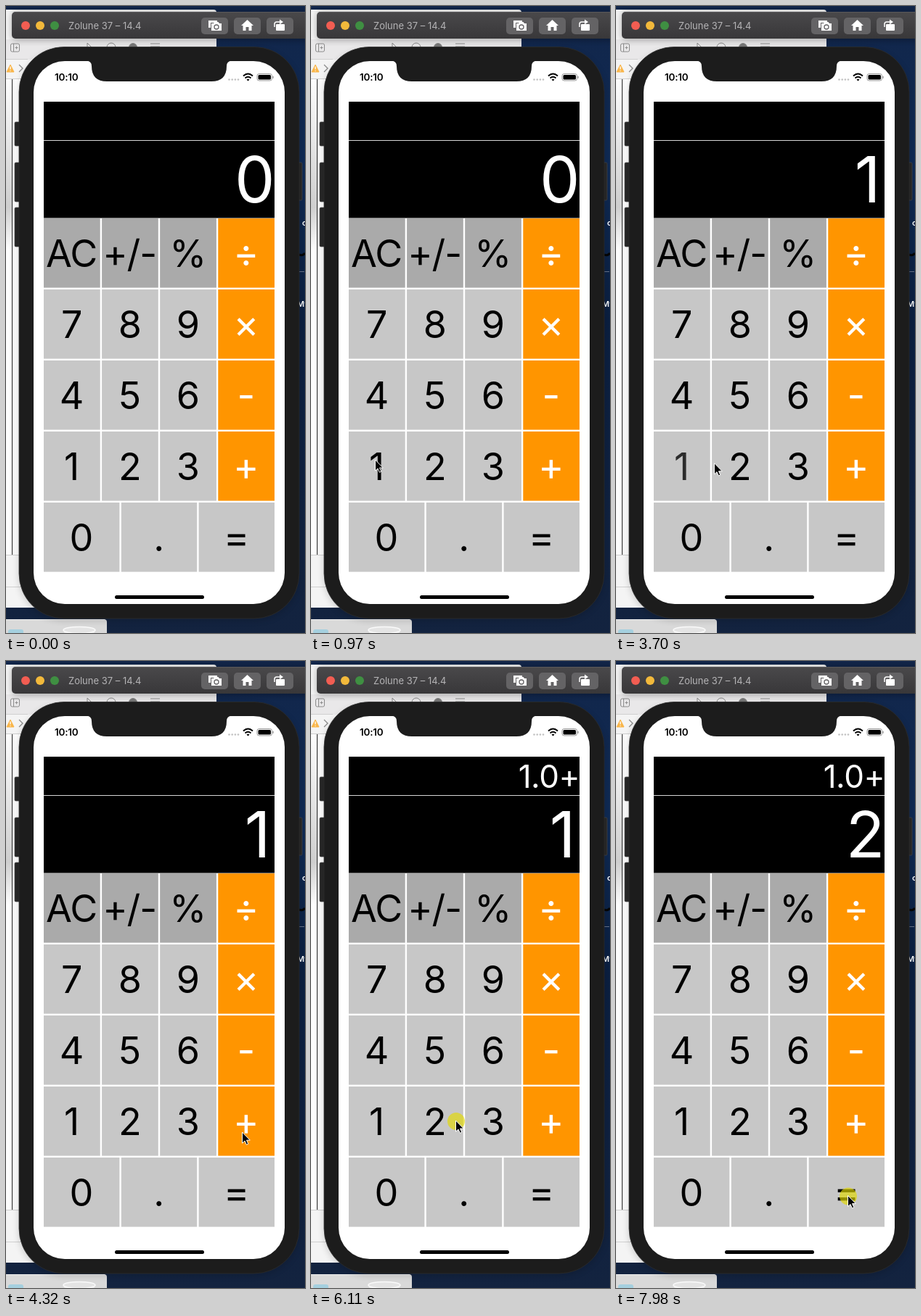
These frames come from a looping animation (412x865 px, 8 s). An HTML page:

```html
<!DOCTYPE html>
<html lang="en">
<head>
<meta charset="utf-8">
<title>Calculator</title>
<style>
html, body { margin: 0; width: 100%; height: 100%; overflow: hidden; background: #0d2346; }
svg { display: block; width: 100vw; height: 100vh; }
text { font-family: Inter, "Open Sans", sans-serif; }
.key { font-size: 52px; text-anchor: middle; letter-spacing: -1px; }
.sign { font-size: 54px; }
.num { fill: #fff; text-anchor: end; letter-spacing: -.5px; }
</style>
</head>
<body>
<svg viewBox="0 0 412 865" preserveAspectRatio="none">
  <defs>
    <linearGradient id="sky" x2="0" y2="1">
      <stop offset="0" stop-color="#12264a"/><stop offset=".25" stop-color="#0f2a54"/>
      <stop offset=".5" stop-color="#0b1f40"/><stop offset="1" stop-color="#13233f"/>
    </linearGradient>
    <linearGradient id="bar" x2="0" y2="1">
      <stop offset="0" stop-color="#4a494b"/><stop offset="1" stop-color="#383739"/>
    </linearGradient>
    <linearGradient id="shade" x2="0" y2="1">
      <stop offset="0" stop-color="#777" stop-opacity="0"/><stop offset=".75" stop-color="#777" stop-opacity=".35"/>
      <stop offset="1" stop-color="#777" stop-opacity="0"/>
    </linearGradient>
    <filter id="blur" x="-20%" y="-20%" width="140%" height="140%"><feGaussianBlur stdDeviation="5"/></filter>
  </defs>

  <!-- desktop and editor window -->
  <rect width="412" height="865" fill="url(#sky)"/>
  <path d="M0 5H286Q290 5 290 9V830H0Z" fill="#f4f4f4"/>
  <rect y="46" width="290" height="28" fill="#e9e8e9"/>
  <path d="M0 73.500H30M0 100.500H30M0 757.500H30M0 801.500H30" stroke="#cfcfcf"/>
  <rect y="101" width="30" height="656" fill="#fdfdfd"/>
  <rect y="101" width="8" height="235" fill="url(#shade)"/>
  <path d="M8.500 101V757" stroke="#222"/>
  <g fill="none" stroke="#8b8b8b">
    <rect x="6.500" y="52" width="12" height="11" rx="2"/>
    <path d="M10.500 52V63M12.500 57.500H16.500M14.500 55.500V59.500M112 58V51L121 60M199 52H212M199 56H212"/>
    <circle cx="145" cy="57" r="6"/><circle cx="175" cy="57" r="5.500" fill="#777"/>
    <path d="M18 81L23 86L18 91" stroke-width="1.300"/>
  </g>
  <path d="M6 81L11 91H1Z" fill="#f9b548" stroke="#f9b548" stroke-linejoin="round"/>
  <path d="M6 83.500V87.500M6 89V90" stroke="#fff" stroke-width="1.300"/>
  <path d="M0 846H135Q139 846 139 850V865H0Z" fill="#d9d9d9"/>
  <path d="M0 846.500H136" stroke="#efefef"/>
  <rect x="3" y="860" width="21" height="8" rx="3" fill="#a5d0df"/>
  <path d="M79 861L82 870H120L123 861Z" fill="#e8e8e8"/>
  <ellipse cx="101" cy="861" rx="22" ry="4.500" fill="#e4e4e4" stroke="#fafafa" stroke-width="1.500"/>
  <g fill="#fff" font-size="11" font-weight="600"><text x="408" y="303">o</text><text x="401" y="415">My</text></g>
  <path d="M404 343Q409 345 412 341" stroke="#050505" stroke-width="3" fill="none"/>
  <path d="M404 366.500H411" stroke="#68738a"/>

  <!-- title bar -->
  <rect x="8" y="8" width="420" height="39" rx="6" fill="#000" opacity=".3" filter="url(#blur)"/>
  <rect x="8" y="8" width="420" height="37" rx="5" fill="url(#bar)"/>
  <path d="M12 8.500H412" stroke="#59585a"/>
  <circle cx="27" cy="27" r="6" fill="#f25d52"/><circle cx="47" cy="27" r="6" fill="#f2b93b"/><circle cx="67" cy="27" r="6" fill="#3f8f42"/>
  <text x="86" y="32" font-size="13" fill="#b5b4b6">Zolune 37 – 14.4</text>
  <g fill="#646365"><rect x="269" y="16" width="37" height="23" rx="5"/><rect x="314" y="16" width="37" height="23" rx="5"/><rect x="359" y="16" width="37" height="23" rx="5"/></g>
  <g fill="#fff">
    <path d="M279 20H291V23H282V30H279Z"/>
    <path d="M283 24H286L287.500 22H292.500L294 24H297V34H283Z"/>
    <circle cx="290" cy="29" r="3" fill="none" stroke="#646365" stroke-width="1.300"/>
    <path d="M332.500 19L341 27H338.500V34H334.500V29H330.500V34H326.500V27H324Z"/>
    <rect x="372" y="25" width="12" height="9" rx="1"/>
    <path d="M370 29V25Q370 22 373 22H378" fill="none" stroke="#fff" stroke-width="1.500"/><path d="M377 18.500L382 22L377 25.500Z"/>
  </g>

  <!-- phone -->
  <rect x="17" y="60" width="388" height="788" rx="62" fill="#000" opacity=".15" filter="url(#blur)"/>
  <g fill="#252525" stroke="#454545" stroke-width=".7">
    <rect x="12" y="160" width="8" height="33" rx="1.500"/><rect x="12" y="216" width="8" height="54" rx="1.500"/>
    <rect x="12" y="278" width="8" height="54" rx="1.500"/><rect x="402" y="216" width="6" height="52" rx="1.500"/>
  </g>
  <rect x="18" y="56.500" width="386" height="788.500" rx="62" fill="#1c1c1c" stroke="#2c2c2c" stroke-width=".8"/>
  <rect x="38" y="76" width="346" height="749" rx="43" fill="#fff"/>
  <path d="M111 75.500Q118 76 118 83Q118 104 139 104H283Q304 104 304 83Q304 76 311 75.500Z" fill="#1c1c1c"/>
  <text x="67" y="103" font-size="13.500" font-weight="600" letter-spacing="-.2">10:10</text>
  <g fill="#c2c2c2"><circle cx="307.500" cy="101.500" r="1.300"/><circle cx="311.700" cy="101.500" r="1.300"/><circle cx="315.900" cy="101.500" r="1.300"/><circle cx="320" cy="101.500" r="1.300"/></g>
  <g fill="none" stroke="#000" stroke-width="2"><path d="M327 96.500Q333.500 90.500 340 96.500M329.500 99.500Q333.500 96 337.500 99.500"/></g>
  <path d="M331.500 101.500Q333.500 99.800 335.500 101.500L333.500 103.500Z"/>
  <rect x="346" y="93.500" width="20.500" height="9.500" rx="2.800" fill="none" stroke="#999"/><rect x="347.500" y="95" width="17.500" height="6.500" rx="1.500"/>
  <path d="M368.200 96.800V99.800" stroke="#999" stroke-width="1.300"/>
  <rect x="150" y="813" width="123" height="5" rx="2.500"/>

  <rect x="52" y="132" width="318" height="160.500"/>
  <path d="M52 185.500H370" stroke="#d6d6d6"/>
  <text id="sum" class="num" x="370" y="175" font-size="44"></text>
  <text id="out" class="num" y="271" font-size="88"></text>
  <g id="keys"></g>
  <circle id="spot" r="12" fill="#e4da00" opacity=".65"/>
  <path id="arrow" d="M0 0V15.200L3.500 12L5.900 17.300L8.300 16.200L6 11.100H10.800Z" stroke="#fff" stroke-width="1"/>
</svg>
<script>
const $ = id => document.getElementById(id);
const NS = "http://www.w3.org/2000/svg";
const LOOP = 8000;
const keys = {};

function add(tag, attrs, text = "") {
  const el = document.createElementNS(NS, tag);
  for (const name in attrs) el.setAttribute(name, attrs[name]);
  el.textContent = text;
  return $("keys").appendChild(el);
}

["AC +/- % ÷", "7 8 9 ×", "4 5 6 -", "1 2 3 +", "0 . ="].forEach((line, row) => {
  const labels = line.split(" "), n = labels.length;
  const w = (318 - 2.4 * (n - 1)) / n, y = 293 + row * 98;
  labels.forEach((label, col) => {
    const x = 52 + col * (w + 2.4), op = col === 3;
    add("rect", { x, y, width: w, height: 95.6, fill: op ? "#ff9500" : row ? "#c7c7c7" : "#aaa" });
    keys[label] = add("text", {
      class: "÷×-+=".includes(label) ? "key sign" : "key",
      x: x + w / 2 - .7, y: y + 67, fill: op ? "#fff" : "#000"
    }, label);
  });
});

const smooth = p => p * p * (3 - 2 * p);
const out = p => 1 - (1 - p) ** 2.5;

// Stepped pointer moves: start, last step, steps, end point, easing
const moves = [
  [130, 830, 10, 89, 627, smooth],
  [3620, 4090, 7, 326, 651, smooth],
  [4400, 4400, 1, 329, 651, out],
  [5560, 5950, 6, 200, 635, out],
  [7350, 7600, 4, 330, 721, smooth],
  [7830, 7910, 2, 320, 738.5, out]
];
const clicks = [[900, 970], [2600, 2760], [4400, 4550], [6110, 6340], [7910, 8000]];
// Key label: pressed, released, fade time
const presses = [["1", 3310, 3620, 160], ["+", 4870, 5560, 230], ["2", 6340, 7040, 0]];
// Main display: from, digit, right edge
const digits = [[0, "0", 370], [3620, "1", 364], [7040, "2", 370]];

function pointer(t) {
  let x = 340, y = 858;
  for (const [a, b, n, tx, ty, ease] of moves) {
    if (t < a) break;
    const step = t >= b ? n : Math.floor((t - a) / (b - a) * (n - 1) + .02) + 1;
    const p = ease(step / n);
    x += (tx - x) * p;
    y += (ty - y) * p;
  }
  return [x, y];
}

function draw(t) {
  const [x, y] = pointer(t);
  const arrow = $("arrow"), spot = $("spot");
  arrow.setAttribute("transform", `translate(${x - .5} ${y - 1})`);
  arrow.style.display = t < 130 ? "none" : "";
  spot.setAttribute("cx", x);
  spot.setAttribute("cy", y);
  spot.style.display = clicks.some(([a, b]) => t >= a && t < b) ? "" : "none";
  for (const [label, down, up, fade] of presses) {
    let alpha = 1;
    if (t >= down && t < up) alpha = .3;
    else if (t >= up && t < up + fade) alpha = .55 + .45 * (t - up) / fade;
    keys[label].setAttribute("opacity", alpha);
  }
  const [, digit, right] = digits.findLast(([from]) => t >= from);
  $("out").textContent = digit;
  $("out").setAttribute("x", right);
  $("sum").textContent = t < 5560 ? "" : "1.0+";
}

let start;
function frame(now) {
  start ??= now;
  draw((now - start) % LOOP);
  requestAnimationFrame(frame);
}
draw(0);
requestAnimationFrame(frame);
</script>
</body>
</html>
```
